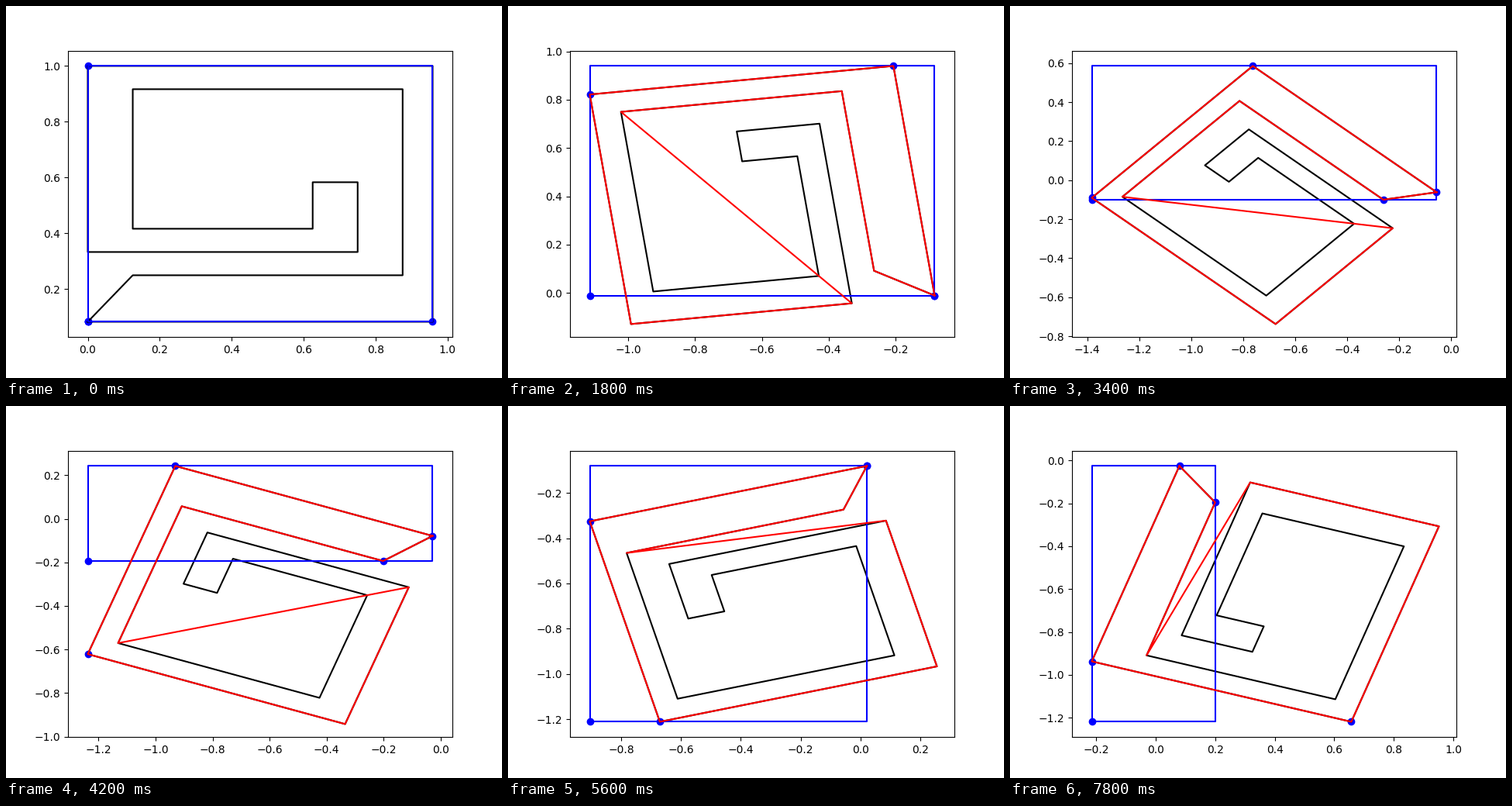
A matplotlib script for the animation above (8 s loop, 640 px wide and 480 px high).

```python
import math

import matplotlib.pyplot as plt
import numpy as np
from matplotlib.animation import FuncAnimation

# Spiral outline on a grid of 24 by 12 units
SPIRAL = np.array([
    (0, 1), (3, 3), (21, 3), (21, 11), (3, 11), (3, 5), (15, 5),
    (15, 7), (18, 7), (18, 4), (0, 4), (0, 12), (23, 12), (23, 1),
]) / (24, 12)
POCKET_END = 10
FRAMES = 40
DOT_PAD = 3  # room in pixels that the axes leave around each dot

# Steps of 0.1 rad, played in the alphabetical order of their numbers
STEPS = sorted(range(63), key=str)[:FRAMES]

fig, ax = plt.subplots(figsize=(6.4, 4.8), dpi=100)


def rotate(points, angle):
    c, s = math.cos(angle), math.sin(angle)
    return points @ np.array([(c, s), (-s, c)])


def by_x(p):
    return p[0]


def by_y(p):
    return p[1]


def extremes(points, quarter):
    """Left, top, right and bottom points; one side stops at a local extreme."""
    pts = [tuple(p) for p in points]
    near = pts[:2]
    right = max(near if quarter == 2 else pts[::-1], key=by_x)
    bottom = min(near if quarter == 1 else pts, key=by_y)
    return min(pts, key=by_x), max(pts, key=by_y), right, bottom


def plot_closed(points, color):
    ring = np.vstack([points, points[:1]])
    ax.plot(ring[:, 0], ring[:, 1], color=color)


def plot_dots(dots):
    """Scatter the dots and widen the data limits by their size."""
    ax.autoscale_view()
    pixels = ax.transData.transform(dots)
    around = np.vstack([pixels - DOT_PAD, pixels + DOT_PAD])
    ax.update_datalim(ax.transData.inverted().transform(around))
    ax.scatter(dots[:, 0], dots[:, 1], color="b")


def update(i):
    angle = STEPS[i] / 10
    quarter = int(angle // (math.pi / 2))
    points = rotate(SPIRAL, angle)

    ax.clear()
    plot_closed(points, "k")

    sides = extremes(points, quarter)
    x0, y1, x1, y0 = sides[0][0], sides[1][1], sides[2][0], sides[3][1]
    plot_closed(np.array([(x0, y0), (x1, y0), (x1, y1), (x0, y1)]), "b")
    plot_dots(np.array(sides + ((x0, y0),)))

    # Bridge over the inner pocket once the box misses a side
    if quarter > 0:
        cut = 5 - quarter
        plot_closed(np.vstack([points[:cut], points[POCKET_END:]]), "r")
    return []


anim = FuncAnimation(fig, update, frames=FRAMES, interval=200,
                     init_func=lambda: update(0), repeat=True,
                     repeat_delay=0, blit=False)
plt.show()
```
